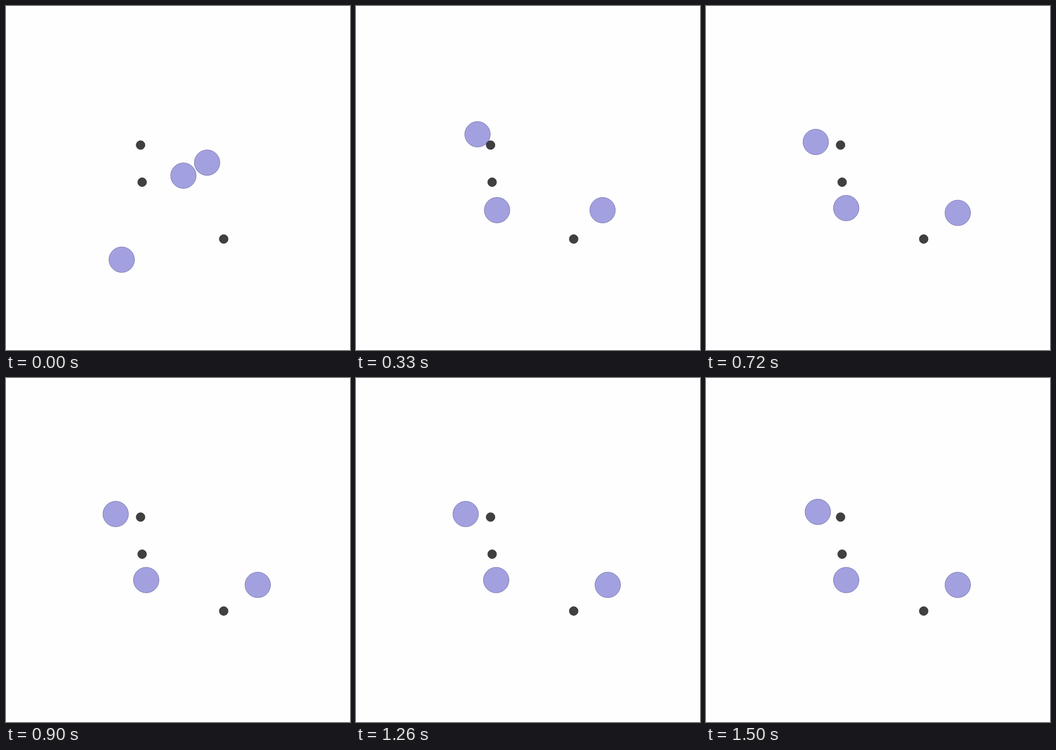
An HTML page with a canvas for the animation above (1.53 s loop, 700x700 px).

```html
<!DOCTYPE html>
<html lang="en">
<head>
<meta charset="utf-8">
<title>Particles settling</title>
<style>
  html, body { margin: 0; width: 100%; height: 100%; overflow: hidden; background: #fefefe; }
  canvas { display: block; width: 700px; height: 700px; }
</style>
</head>
<body>
<canvas id="stage" width="700" height="700"></canvas>
<script>
const ctx = document.getElementById('stage').getContext('2d');
const STEP = 30, STEPS = 51;

const point = (x, y) => ({ x, y });
const anchors = [point(273.8, 283), point(277, 358.5), point(443, 474.2)];

// Each particle bends from start towards end; pace is its settling time in steps.
const left = { start: point(361, 345.2), bend: point(301, 211), end: point(223, 277), pace: 7.6 };
const lower = { start: point(235.5, 516.2), bend: point(299, 434), end: point(285.3, 411.2), pace: 6.33 };
const right = { start: point(409.2, 318.8), bend: point(447.6, 389.8), end: point(512.3, 421), pace: 6.33 };

// Quadratic curve whose remaining share decays like a stretched exponential.
function settle({ start, bend, end, pace }, n) {
  const rest = Math.exp(-Math.pow(n / pace, 1.65)), done = 1 - rest;
  const mix = axis =>
    rest * rest * start[axis] + 2 * rest * done * bend[axis] + done * done * end[axis];
  return point(mix('x'), mix('y'));
}

// The left particle never comes to rest: it swings along a short diagonal.
function swing(n) {
  return n < 18 ? 0 : 3.8 * (1 - Math.cos((n - 24.3) * Math.PI / 3));
}

function disc({ x, y }, radius, fill, stroke) {
  ctx.beginPath();
  ctx.arc(x, y, radius, 0, 2 * Math.PI);
  ctx.fillStyle = fill;
  ctx.fill();
  ctx.strokeStyle = stroke;
  ctx.stroke();
}

function draw(now) {
  const n = Math.floor(now / STEP) % STEPS;
  ctx.fillStyle = '#fefefe';
  ctx.fillRect(0, 0, 700, 700);

  const particles = [left, lower, right].map(path => settle(path, n));
  particles[0].x += swing(n);
  particles[0].y -= swing(n);

  for (const p of particles) disc(p, 26, '#a2a0df', '#7876ad');
  for (const p of anchors) disc(p, 9, '#404040', '#343434');
}

const start = performance.now();
function tick() {
  draw(performance.now() - start);
  requestAnimationFrame(tick);
}
tick();
</script>
</body>
</html>
```
